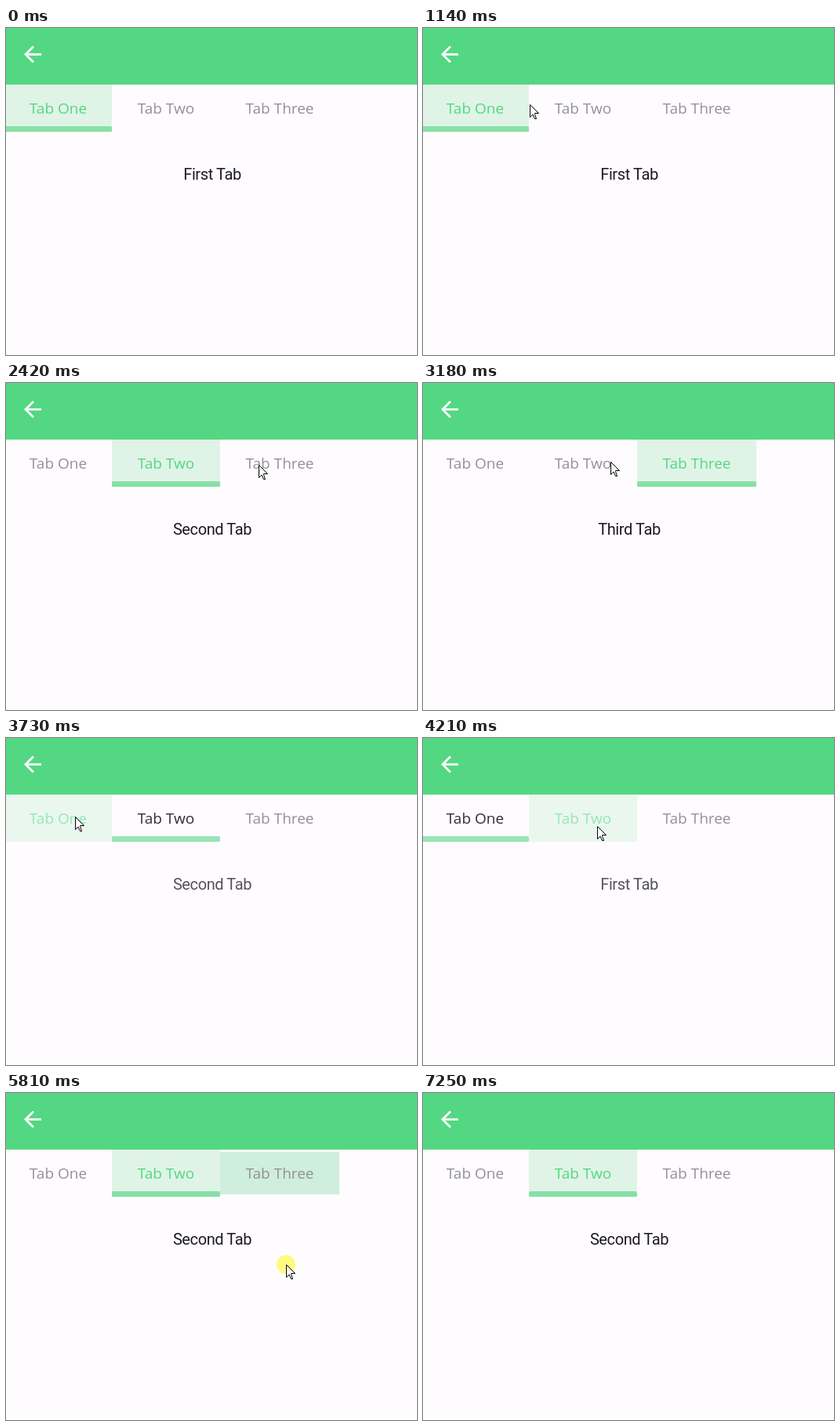
An HTML page for the animation above (7.66 s loop, 524x416 px).

```html
<!DOCTYPE html>
<html lang="en">
<head>
<meta charset="utf-8">
<title>Tabs</title>
<style>
  html, body { margin: 0; width: 100%; height: 100%; overflow: hidden; background: #fffcff; }
  svg { display: block; width: 524px; height: 416px; }
  text { text-anchor: middle; }
  .label { font: 19px "Open Sans", sans-serif; }
  #page { font: 20px Roboto, sans-serif; letter-spacing: -.02em; fill: #1d1b1f; }
</style>
</head>
<body>
<svg viewBox="0 0 524 416">
  <rect width="524" height="72" fill="#54d782"/>
  <path transform="translate(17.5 17) scale(1.375)" fill="#fff"
    d="M20 11H7.83l5.59-5.59L12 4l-8 8 8 8 1.41-1.41L7.83 13H20z"/>
  <g id="tabs"></g>
  <text id="page" x="263" y="193"></text>
  <g id="pointer">
    <circle id="press" r="12" fill="#fffb7f"/>
    <path d="M.5 .5V16.5L4 13L6.5 18.5H8.5L6.5 12.5V11.5H11.5Z" fill="#fff" stroke="#000"/>
  </g>
</svg>
<script>
const LOOP = 7660, STEP = 70, CLICK_DELAY = 60;
const HOLD = 4910, DRAG = 5600, RELEASE = 6090, LEAVE = 7250;
const $ = id => document.getElementById(id);

function add(name, attrs) {
  const el = document.createElementNS('http://www.w3.org/2000/svg', name);
  for (const key in attrs) el.setAttribute(key, attrs[key]);
  return $('tabs').appendChild(el);
}

let left = -2;
const tabs = [['One', 'First', 137], ['Two', 'Second', 138], ['Three', 'Third', 152]].map(([name, page, width]) => {
  const x = left;
  left += width;
  const tab = {
    page: page + ' Tab',
    fill: add('rect', { x, y: 72, width, height: 60 }),
    held: add('rect', { x, y: 75, width, height: 54, fill: '#cfefdc' }),
    bar: add('rect', { x, y: 125, width, height: 7, rx: 1.5 }),
    label: add('text', { x: x + width / 2, y: 109, class: 'label' })
  };
  tab.label.textContent = 'Tab ' + name;
  return tab;
});

// Pointer moves: where each ends, how far it bows, and the tab clicked on arrival.
const moves = [
  { at: 660, ms: 280, x: 106, y: 95 },
  { at: 1070, ms: 410, x: 204, y: 103 },
  { at: 1550, ms: 340, x: 204, y: 103, bow: [4, 4], click: 1 },
  { at: 2150, ms: 350, x: 345, y: 104, click: 2 },
  { at: 2840, ms: 350, x: 235, y: 100, click: 1 },
  { at: 3450, ms: 150, x: 88, y: 100, click: 0 },
  { at: 3870, ms: 210, x: 222, y: 112, click: 1 },
  { at: 4350, ms: 560, x: 357, y: 102, bow: [0, 83] },
  { at: 4980, ms: 340, x: 358, y: 110 },
  { at: DRAG, ms: 210, x: 357, y: 218, bow: [3, 0] },
  { at: 6360, ms: 820, x: 440, y: 391, bow: [-275, -185] }
];
const easeOut = k => 1 - (1 - k) ** 2;

function pointerAt(t) {
  let x = 339, y = 377;
  for (const { at, ms, x: toX, y: toY, bow = [0, 0] } of moves) {
    if (t < at) break;
    const steps = Math.round(ms / STEP);
    const k = easeOut(Math.min(1, Math.floor((t - at) / ms * steps) / steps));
    const swing = Math.sin(Math.PI * k);
    x += (toX - x) * k + bow[0] * swing;
    y += (toY - y) * k + bow[1] * swing;
  }
  return [Math.round(x), Math.round(y)];
}

// phase 0, 1: the old tab leaves; 2: the new page fades in; 3: settled
function tabState(t) {
  let from = 0, to = 0, phase = 3;
  for (const { at, ms, click } of moves) {
    const since = t - at - ms - CLICK_DELAY;
    if (click === undefined || since < 0) continue;
    from = to;
    to = click;
    phase = Math.min(3, Math.floor(since / STEP));
  }
  return { to, phase, current: phase < 2 ? from : to };
}

function show(el, on) { el.setAttribute('visibility', on ? 'visible' : 'hidden'); }

function render(t) {
  const { to, phase, current } = tabState(t);
  const leaving = phase < 2;
  tabs.forEach((tab, i) => {
    const active = i === current, target = leaving && i === to;
    show(tab.fill, target || (active && !leaving));
    show(tab.bar, active);
    show(tab.held, i === 2 && t >= HOLD && t < RELEASE);
    tab.fill.setAttribute('fill', target ? '#eaf7ef' : '#dff4e6');
    tab.bar.setAttribute('fill', leaving ? '#97e5b5' : '#88e0a8');
    tab.label.setAttribute('fill',
      target ? '#96e6b5' : !active ? '#929094' : leaving ? '#302d33' : '#54d782');
  });
  $('page').textContent = tabs[current].page;
  $('page').setAttribute('opacity', phase < 3 ? 0.75 : 1);

  const visible = t >= moves[0].at && t < LEAVE;
  show($('pointer'), visible);
  show($('press'), t >= DRAG && t < RELEASE);
  $('pointer').setAttribute('transform', `translate(${pointerAt(t)})`);
}

const start = performance.now();
function tick() {
  render((performance.now() - start) % LOOP);
  requestAnimationFrame(tick);
}
tick();
</script>
</body>
</html>
```
